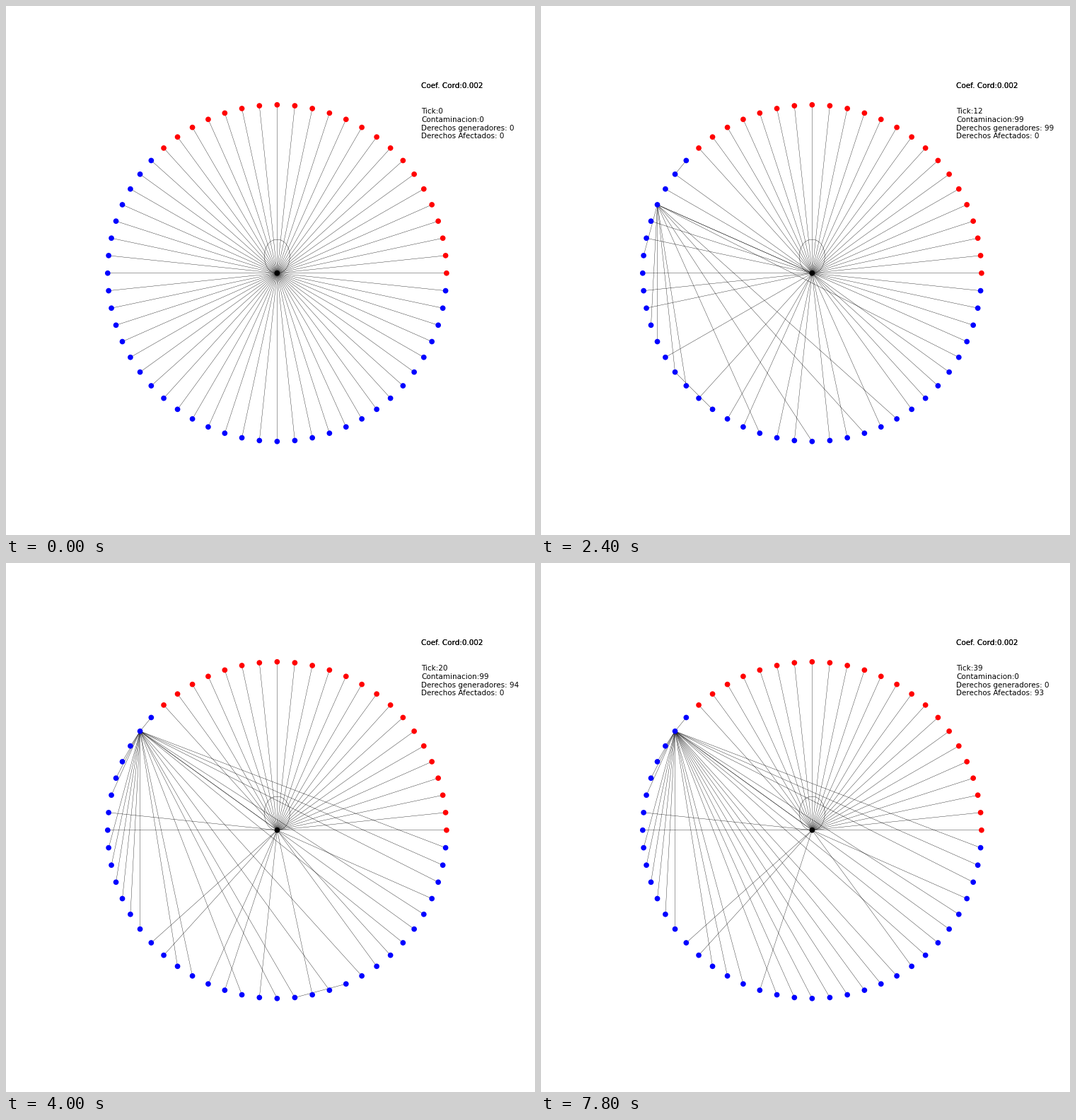
Animation, 748 px wide and 748 px high, one loop 8 s. Source, as a matplotlib script:

```python
import random

import numpy as np
import matplotlib.pyplot as plt
from matplotlib.animation import FuncAnimation
from matplotlib.collections import LineCollection
from matplotlib.patches import PathPatch
from matplotlib.path import Path

TICKS, STEP = 40, 200
COUNT, REDS = 60, 23
CENTER = COUNT
MERGE, SETTLED = 13, 24          # all move to one hub, then nothing changes

HUBS = {1: 28, 7: 29, 11: 26, MERGE: 24}              # start tick: hub
EARLY = [50, 34, 48, 55, 33, 42, 45, 56, 37, 36]      # in joining order
LATE = [28, 33, 36, 39, 44, 47, 52, 41, 49]
HOLDOUTS = [29, 30, 37, 38, 42, 51, 56]

rng = random.Random(4)
angles = 2 * np.pi * np.arange(COUNT) / COUNT
pos = np.vstack([np.column_stack([np.cos(angles), np.sin(angles)]), [0, 0]])

first_join = {n: 3 + i for i, n in enumerate(EARLY)}
final_join = {n: rng.randint(MERGE, MERGE + 4) for n in range(REDS, COUNT)}
final_join.update({n: MERGE for n in EARLY})
final_join.update({n: 18 + i * 3 // 4 for i, n in enumerate(LATE)})
final_join.update({n: TICKS for n in HOLDOUTS})


def targets(t):
    """Node that each outer node is tied to at tick t."""
    row = [CENTER] * COUNT
    if t == 0:
        return row
    past = [hub for start, hub in HUBS.items() if start <= t]
    hub = past[-1]
    join = first_join if t < MERGE else final_join
    for n, start in join.items():
        if start <= t:
            row[n] = hub
    if len(past) > 1:
        row[past[-2]] = hub
    if t >= 5:
        row[REDS] = REDS + 1
    # One undecided node at a time copies a close neighbour.
    waiting = [n for n in LATE if final_join[n] > t and row[n] == CENTER]
    if t >= 12 and waiting:
        n = rng.choice(waiting)
        row[n] = n - 3
    row[hub] = CENTER
    return row


history = [targets(t) for t in range(TICKS)]


def counters(t):
    if t == 0:
        return 0, 0, 0
    if t >= SETTLED:
        return (93 if t == SETTLED else 0), 0, 93
    return (94 if t % 7 == 3 else 99), (99 if t < 20 else 94), 0


fig = plt.figure(figsize=(8.5, 8.5), dpi=88, facecolor="white")
ax = fig.add_axes([0.125, 0.11, 0.775, 0.77])
ax.set_xlim(-1.21, 1.21)
ax.set_ylim(-1.21, 1.21)
ax.axis("off")

LINE = dict(linewidth=0.3, zorder=1, snap=False)
edges = LineCollection([], colors="black", **LINE)
ax.add_collection(edges, autolim=False)

h, w = 0.2, 0.1
loop = Path([(0, h), (w, h), (w, 0), (0, 0), (-w, 0), (-w, h), (0, h)],
            [Path.MOVETO] + [Path.CURVE4] * 6)
ax.add_patch(PathPatch(loop, fill=False, edgecolor="black", **LINE))

colors = ["red"] * REDS + ["blue"] * (COUNT - REDS) + ["black"]
ax.scatter(pos[:, 0], pos[:, 1], s=39.7, c=colors, linewidths=0, zorder=2)


def label(y, text=""):
    return ax.text(0.85, y - 0.0005, text, fontsize=8.5,
                   family="DejaVu Sans", color="black", zorder=3)


# Drawn twice, which makes the strokes a little heavier.
for _ in range(2):
    label(1.1, "Coef. Cord:0.002")
rows = [label(0.95 - 0.05 * i) for i in range(4)]
NAMES = ("Tick:", "Contaminacion:", "Derechos generadores: ",
         "Derechos Afectados: ")


def draw(t):
    edges.set_segments([(pos[n], pos[m]) for n, m in enumerate(history[t])])
    for row, name, value in zip(rows, NAMES, (t, *counters(t))):
        row.set_text(f"{name}{value}")
    return [edges, *rows]


anim = FuncAnimation(fig, draw, frames=TICKS, interval=STEP,
                     repeat=True, repeat_delay=0, blit=False)
plt.show()
```
